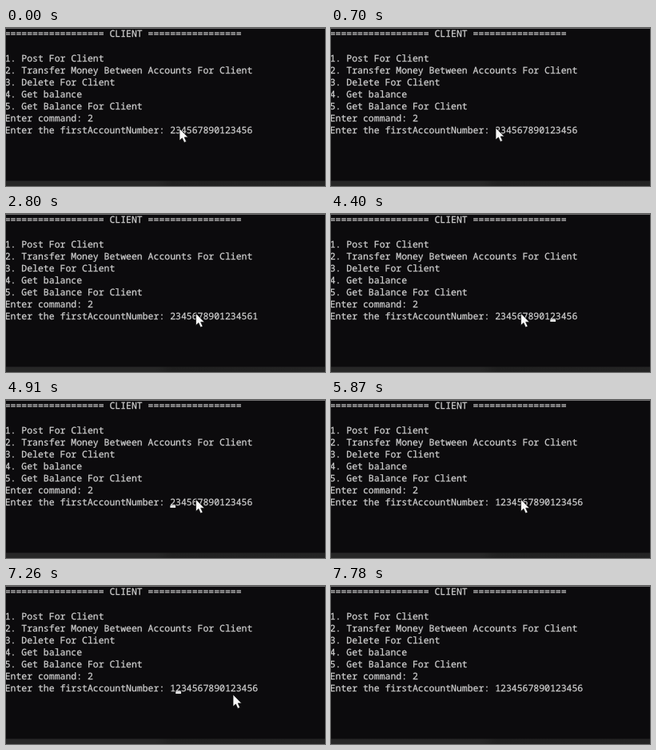
Recreate the animation shown at these times as an HTML page. Size 399x198 px, loop 8 s.

```html
<!DOCTYPE html>
<html lang="en">
<head>
<meta charset="utf-8">
<title>Console client</title>
<style>
  html, body { margin: 0; width: 100%; height: 100%; overflow: hidden; background: #0c0b0d; }
  svg { display: block; width: 100%; height: 100%; }
  text {
    font: 11.48px "Noto Sans Mono", "DejaVu Sans Mono", monospace;
    fill: #cfcfcf;
    stroke: #cfcfcf;
    stroke-width: .25px;
    white-space: pre;
    text-rendering: geometricPrecision;
  }
  #screen { filter: blur(.4px); }
</style>
</head>
<body>
<svg viewBox="0 0 399 198">
  <defs>
    <linearGradient id="strip">
      <stop offset=".47" stop-color="#272727"/>
      <stop offset=".52" stop-color="#202020"/>
      <stop offset="1" stop-color="#242424"/>
    </linearGradient>
  </defs>
  <rect width="399" height="198" fill="#0c0b0d"/>
  <rect width="399" height="1" fill="#707070"/>
  <g id="screen">
    <g id="console"></g>
    <rect id="selection" x="198" y="120.5" width="6.8" height="13.5" fill="#f2f2f2"/>
    <rect id="caret" y="132.2" width="6.8" height="2.8" fill="#e8e8e8"/>
    <path id="pointer" d="M0 0V15L3.4 12 5.9 17.5 8.6 16.3 6.2 10.9H10.7Z"
          fill="#f8f8f8" stroke="#111" stroke-width=".7"/>
  </g>
  <rect y="191.5" width="399" height="6.5" fill="url(#strip)"/>
</svg>
<script>
const LOOP = 8000, BLINK = 530, REPEAT = 31;
const CELL = 6.888, LEFT = -1.3, ROW = 15.1, BASELINE = 11.4;
const PROMPT = 'Enter the firstAccountNumber: ';
const DIGITS = '234567890123456';

const lines = [
  '='.repeat(18) + ' CLIENT ' + '='.repeat(17),
  '',
  '1. Post For Client',
  '2. Transfer Money Between Accounts For Client',
  '3. Delete For Client',
  '4. Get balance',
  '5. Get Balance For Client',
  'Enter command: 2',
  PROMPT
];

// After each input the caret stays solid for a while, then blinks
const inputs = [
  { at: -400, value: DIGITS, cell: 15, solid: 0 },
  { at: 1740, value: DIGITS + '1', cell: 16, solid: 1060 },
  { at: 3710, value: DIGITS, cell: 14, solid: 1200, heldUntilCell: 2 },
  { at: 4910, value: DIGITS, cell: 0, solid: 310 },
  { at: 5430, value: '1' + DIGITS, cell: 1, solid: 440 },
  { at: 7260, value: '1' + DIGITS, cell: 1, solid: 520 }
];
const HOLD_START = 4276;

const home = { x: 217, y: 126 };
const glides = [
  { start: 130, end: 700, x: 206, y: 125 },
  { start: 900, end: 1130, x: 192, y: 115 },
  { start: 1130, end: 1310, x: 237.5, y: 124.5 },
  { start: 6740, end: 7260, x: 284, y: 136 },
  { start: 7260, end: 7780, x: 344, y: 194 }
];
const SELECT_START = 1150, SELECT_END = 1740;

const byId = id => document.getElementById(id);
const caret = byId('caret'), pointer = byId('pointer'), selection = byId('selection');
const clamp = (v, low, high) => Math.max(low, Math.min(high, v));
const ease = k => k * k * (3 - 2 * k);
const show = (node, visible) => node.setAttribute('visibility', visible ? 'visible' : 'hidden');

const rows = lines.map((line, i) => {
  const row = document.createElementNS('http://www.w3.org/2000/svg', 'text');
  row.setAttribute('x', LEFT);
  row.setAttribute('y', BASELINE + i * ROW);
  row.textContent = line;
  return byId('console').appendChild(row);
});
const inputRow = rows.at(-1);

function pointerAt(t) {
  let { x, y } = home;
  for (const glide of glides) {
    const k = ease(clamp((t - glide.start) / (glide.end - glide.start), 0, 1));
    x += (glide.x - x) * k;
    y += (glide.y - y) * k;
  }
  return [x, y];
}

function caretCell({ cell, heldUntilCell = cell }, t) {
  return clamp(cell - Math.floor((t - HOLD_START) / REPEAT), heldUntilCell, cell);
}

function draw(t) {
  const input = inputs.findLast(({ at }) => at <= t);
  const content = PROMPT + input.value;
  if (inputRow.textContent !== content) inputRow.textContent = content;

  const blinks = Math.floor((t - input.at - input.solid) / BLINK);
  show(caret, blinks < 0 || blinks % 2 === 1);
  caret.setAttribute('x', LEFT + (PROMPT.length + caretCell(input, t)) * CELL);

  show(selection, t >= SELECT_START && t < SELECT_END);
  pointer.setAttribute('transform', `translate(${pointerAt(t)})`);
}

let start;
function tick(now) {
  start ??= now;
  draw((now - start) % LOOP);
  requestAnimationFrame(tick);
}
draw(0);
requestAnimationFrame(tick);
</script>
</body>
</html>
```
